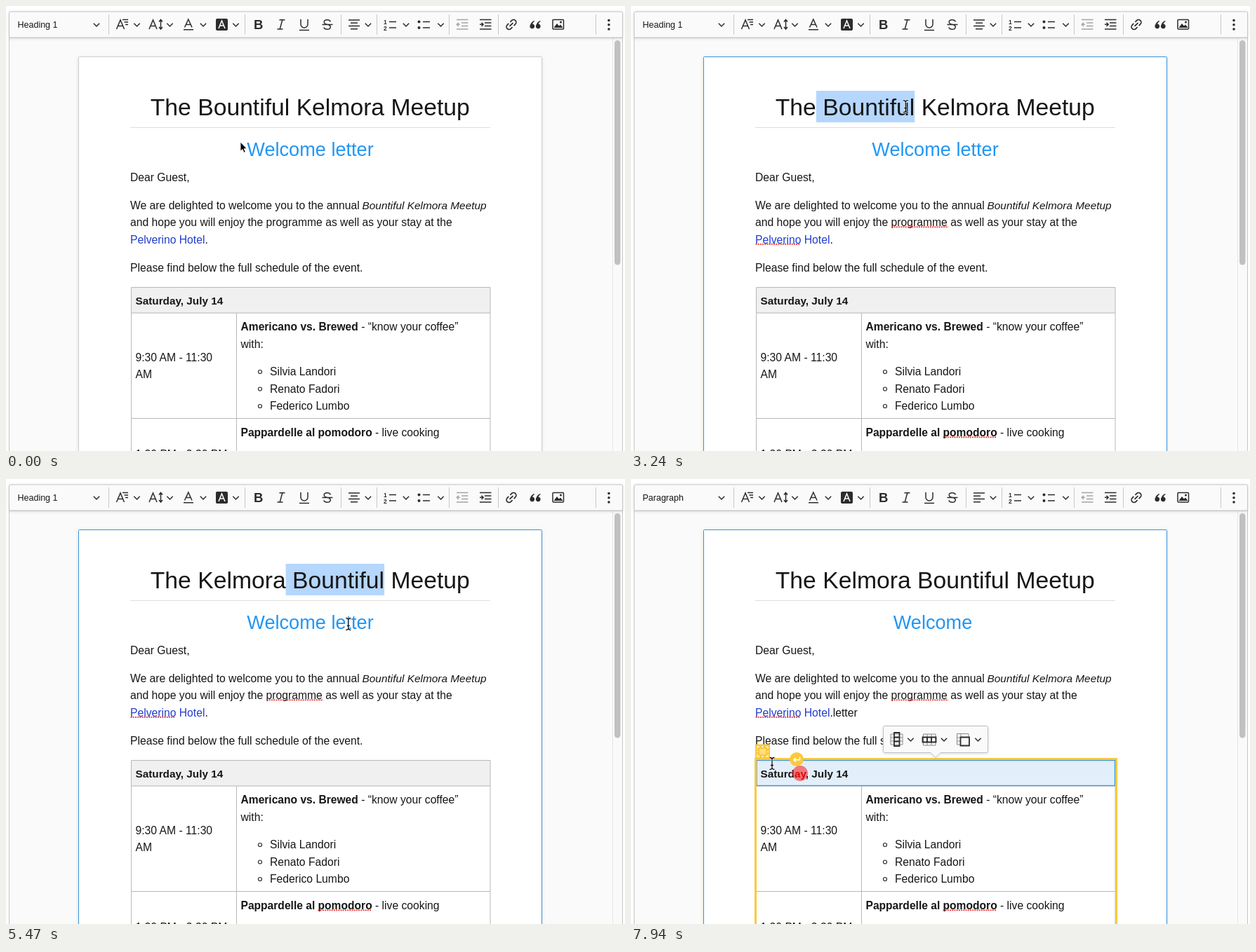
Recreate the animation shown at these times as an HTML page. Size 882 px wide and 635 px high, loop 8000 ms.

```html
<!DOCTYPE html>
<html lang="en">
<head>
<meta charset="utf-8">
<title>Document editor</title>
<style>
  html, body { margin: 0; width: 100%; height: 100%; overflow: hidden; background: #fff; }
  svg { display: block; width: 882px; height: 635px; font: 15.7px "Liberation Sans", Arial, sans-serif; fill: #161616; }
  text { white-space: pre; }
  .title { font-size: 33.7px; text-anchor: middle; }
  .sub { font-size: 27.15px; fill: #2196f3; text-anchor: middle; }
  .b { font-weight: bold; font-size: 15.6px; }
  .line { fill: none; stroke: #2c2c2c; stroke-width: 1.5; }
  .off { stroke: #a5a5a5; }
  .rule { fill: none; stroke: #b8b8b8; }
  .spell { stroke: #f0322d; stroke-width: 1.8; stroke-dasharray: 2 1.2; }
  .sel { fill: #b5d6fd; }
  .drop { fill: #2d86dc; }
  .gold { fill: #fbc93d; }
  .lit { mix-blend-mode: lighten; fill: #b00; }
</style>
</head>
<body>
<svg viewBox="0 0 882 635">
  <defs>
    <linearGradient id="fadeDark">
      <stop offset="0" stop-color="#222" stop-opacity=".45"/>
      <stop offset=".5" stop-color="#222" stop-opacity=".8"/>
      <stop offset="1" stop-color="#222" stop-opacity=".4"/>
    </linearGradient>
    <radialGradient id="haze">
      <stop offset="0" stop-color="#000" stop-opacity=".07"/>
      <stop offset="1" stop-color="#000" stop-opacity="0"/>
    </radialGradient>
    <filter id="soft" x="-10%" y="-10%" width="120%" height="130%">
      <feDropShadow dx="0" dy="1" stdDeviation="2" flood-opacity=".13"/>
    </filter>
    <path id="chev" class="line" d="M-4.2-2.2 0 2 4.2-2.2"/>
    <path id="arrow" d="M0 0V13.2L3 10.5 5.1 15.3 7.3 14.3 5.2 9.7H9.2Z" fill="#000" stroke="#fff" stroke-width=".9"/>
    <path id="beam" d="M-3.5-8.5Q-.6-8.5 0-6.5 .6-8.5 3.5-8.5M0-7V7M-3.5 8.5Q-.6 8.5 0 6.5 .6 8.5 3.5 8.5M-2 2.5H2" fill="none"/>
  </defs>

  <!-- frame and page -->
  <rect x="4.5" y="45" width="874" height="600" fill="#fafafa" stroke="#c4c4c4"/>
  <path d="M864.5 46V635" stroke="#e6e6e6"/>
  <rect x="867" y="49" width="8.5" height="320.5" rx="4.2" fill="#c1c1c1"/>
  <rect id="page" x="103.5" y="72.5" width="660" height="600" rx="1" fill="#fff" stroke="#cfcfcf" filter="url(#soft)"/>

  <!-- headings -->
  <rect id="titleSel" class="sel" y="121" height="45"/>
  <text id="titleA" class="title" x="433.3" y="156">The Bountiful Kelmora Meetup</text>
  <text id="titleB" class="title" x="433.3" y="156">The Kelmora Bountiful Meetup</text>
  <path d="M177 173.5H690" stroke="#dedede"/>
  <rect id="subSel" class="sel" x="463" y="179" width="61" height="50.5"/>
  <text id="sub" class="sub" y="214">Welcome letter</text>

  <!-- body -->
  <text x="177" y="250">Dear Guest,</text>
  <text x="177" y="290">We are delighted to welcome you to the annual</text>
  <text x="507.5" y="290" font-style="italic" font-size="15.4">Bountiful Kelmora Meetup</text>
  <text x="177" y="314">and hope you will enjoy the programme as well as your stay at the</text>
  <text id="hotel" x="177" y="338.5"><tspan fill="#1f3cd0">Pelverino Hotel</tspan>.<tspan id="moved">letter</tspan></text>
  <text x="177" y="378.5">Please find below the full schedule of the event.</text>

  <!-- table -->
  <rect x="178.5" y="401.5" width="511.5" height="37" fill="#f0f0f0"/>
  <rect id="cell" x="179" y="401.5" width="510.5" height="36" fill="#e2effb"/>
  <path class="rule" d="M178.5 640V401.5H690V640M178.5 438H690M178.5 588.5H690M328.5 438V640"/>
  <rect id="cellEdge" x="179" y="401.5" width="510.5" height="36" fill="none" stroke="#3f95dd" stroke-width="1.3"/>
  <text class="b" x="184.5" y="426" style="font-size:15.3px">Saturday, July 14</text>
  <text x="184.5" y="507">9:30 AM - 11:30</text>
  <text x="184.5" y="531">AM</text>
  <text x="334.5" y="463"><tspan class="b">Americano vs. Brewed</tspan> - “know your coffee”</text>
  <text x="334.5" y="487.5">with:</text>
  <g class="line" style="stroke-width:1.2">
    <circle cx="362" cy="522" r="2.5"/><circle cx="362" cy="546.5" r="2.5"/><circle cx="362" cy="571" r="2.5"/>
  </g>
  <text x="376" y="527">Silvia Landori</text>
  <text x="376" y="551.5">Renato Fadori</text>
  <text x="376" y="575.5">Federico Lumbo</text>
  <text x="334.5" y="614"><tspan class="b">Pappardelle al pomodoro</tspan> - live cooking</text>
  <text x="184.5" y="644.5">1:30 PM - 3:30 PM</text>
  <g id="spell" class="spell">
    <path d="M371.5 315.3H452"/><path d="M177.5 339.8H241.5"/><path d="M444.5 615.3H521"/>
  </g>

  <!-- table hover controls -->
  <rect id="ring" x="177.5" y="399.5" width="514" height="250" fill="none" stroke="#fbc93d" stroke-width="3"/>
  <g id="grip">
    <rect class="gold" x="177" y="378.5" width="21" height="21"/>
    <path d="M180 385V382H183M192 382H195V385M195 393V396H192M183 396H180V393M186 382H189M186 396H189M180 388V390M195 388V390" fill="none" stroke="#fff3cf" stroke-width="1.3"/>
    <rect x="183" y="385" width="9" height="8" fill="#ffdf85"/>
  </g>
  <g id="knob">
    <circle class="gold" cx="236" cy="400" r="10"/>
    <path d="M240.5 396.5V400.8H232M234.8 398 232 400.8 234.8 403.6" fill="none" stroke="#fff" stroke-width="1.6"/>
  </g>

  <path id="caret" stroke="#000" stroke-width="1.2"/>

  <!-- floating table tools -->
  <g id="popup">
    <path d="M361.5 352.5H506.5Q508.5 352.5 508.5 354.5V388.5Q508.5 390.5 506.5 390.5H441L434 397.5 427 390.5H361.5Q359.5 390.5 359.5 388.5V354.5Q359.5 352.5 361.5 352.5Z" fill="#fafafa" stroke="#bfbfbf" filter="url(#soft)"/>
    <g class="line" style="stroke-width:1">
      <path d="M370 364H387V379H370ZM370 369H387M370 374H387" stroke="#8a8a8a"/>
      <path d="M375 362H382.5V381H375ZM375 368.5H382.5M375 374.5H382.5" stroke-width="1.8"/>
      <path d="M416.5 364H434V380H416.5ZM422 364V380M428 364V380" stroke="#8a8a8a"/>
      <path d="M415.5 368.5H434.5V375.5H415.5ZM422 368.5V375.5M428 368.5V375.5" stroke-width="1.8"/>
      <path d="M464.5 363.5H481V379H464.5ZM470 363.5V379M464.5 369H481M464.5 374H481" stroke="#8a8a8a"/>
      <path d="M469.5 368.5H482V380.5H469.5Z" fill="#fafafa" stroke-width="1.8"/>
    </g>
    <use href="#chev" x="398.5" y="372"/><use href="#chev" x="446" y="372"/><use href="#chev" x="494.5" y="372"/>
  </g>

  <!-- main toolbar -->
  <rect x="4.5" y="8" width="874" height="37" rx="2" fill="#fafafa" stroke="#c4c4c4" filter="url(#soft)"/>
  <g id="bar"></g>
  <text id="style" x="16.5" y="30.5" font-size="12.5">Heading 1</text>
  <g class="line">
    <path d="M157.5 33 163 20 168.5 33M159.5 28.5H166.5M166 19.5H174M168.5 23H174M170 26.5H174"/>
    <path d="M204 33 209.5 20 215 33M206 28.5H213M220.5 20V32.5M218 22.5 220.5 19.5 223 22.5M218 30 220.5 33 223 30"/>
    <path d="M254.5 30.5 259.8 19 265 30.5M256.5 26.5H263M253 33.8H267"/>
    <rect x="299" y="18" width="17" height="17" rx="2" fill="#2c2c2c" stroke="none"/>
    <path d="M303 32 307.5 21 312 32M304.8 28H310.3" stroke="#fff"/>
    <path d="M389.5 19.8H397.5M386.5 33H394.5M393.8 20 390.2 33"/>
    <path d="M420 19V26A5 5 0 0 0 430 26V19M418 34.5H432"/>
    <path d="M462.5 22.3Q461 19.5 457.5 19.7 453 20 453.3 23 453.5 25.5 457.5 26.3 462.5 27.5 462.3 30 462 33.2 457.8 33.3 454 33.3 452.8 30.5M450.5 26.5H465.5"/>
    <path id="align"/>
    <path d="M546 22.5H556M546 31H556M594 22.5H604M594 31H604"/>
    <path class="off" d="M642 19.5H658.5M649 24H658.5M649 28.5H658.5M642 33H658.5M647 26.3H642.5M645 23.7 642.3 26.3 645 29"/>
    <path d="M675 19.5H691.5M682 24H691.5M682 28.5H691.5M675 33H691.5M675 26.3H680M677.5 23.7 680.2 26.3 677.5 29"/>
    <g transform="rotate(-45 720 26.5)">
      <path d="M718.5 22.8H715.5A3.7 3.7 0 0 0 715.5 30.2H718.5M721.5 22.8H724.5A3.7 3.7 0 0 1 724.5 30.2H721.5M716.5 26.5H723.5" stroke-width="1.7"/>
    </g>
    <rect x="779" y="19.5" width="15.5" height="13.5" rx="1"/>
    <path d="M780.5 31 785 25 788 28.5 790 26.5 793.5 31Z" fill="#2c2c2c" stroke="none"/>
    <circle cx="790.5" cy="23" r="1.5" fill="#2c2c2c" stroke="none"/>
  </g>
  <g fill="#2c2c2c">
    <text x="353" y="33" font-weight="bold" font-size="18.5">B</text>
    <text x="538" y="25.5" font-size="8.5" font-weight="bold">1</text>
    <text x="538" y="35" font-size="8.5" font-weight="bold">2</text>
    <circle cx="588.5" cy="22.5" r="2"/><circle cx="588.5" cy="31" r="2"/>
    <path d="M753 21Q748.5 22 746.5 28A3.4 3.4 0 1 0 750 25.5Q751 23 753 22ZM761.5 21Q757 22 755 28A3.4 3.4 0 1 0 758.5 25.5Q759.5 23 761.5 22Z"/>
    <circle cx="859" cy="20.5" r="1.8"/><circle cx="859" cy="26.8" r="1.8"/><circle cx="859" cy="33" r="1.8"/>
  </g>

  <!-- drag pieces, click mark, pointer -->
  <g id="ghostA">
    <ellipse cx="338" cy="146" rx="76" ry="24" fill="url(#haze)"/>
    <text x="273.3" y="156" font-size="33.7" fill="url(#fadeDark)">Bountiful</text>
  </g>
  <text id="ghostB" x="463" y="214" font-size="27.15" fill="#2196f3" opacity=".65">letter</text>
  <path id="mark" class="drop"/>
  <g id="press"><circle class="lit"/><circle fill="#f00" opacity=".5"/></g>
  <use id="tip" href="#arrow"/>
  <g id="ibeam">
    <use href="#beam" stroke="#fff" stroke-width="3" stroke-opacity=".8"/>
    <use href="#beam" stroke="#111" stroke-width="1.3"/>
  </g>
</svg>
<script>
const LOOP = 8000;
const $ = id => document.getElementById(id);
const set = (el, attrs) => { for (const k in attrs) el.setAttribute(k, attrs[k]); };
const show = (id, on) => { $(id).style.visibility = on ? 'visible' : 'hidden'; };
const move = (id, x, y) => $(id).setAttribute('transform', `translate(${x} ${y})`);
const ramp = (t, a, b) => Math.min(1, Math.max(0, (t - a) / (b - a)));
const within = (t, a, b) => t >= a && t < b;
const smooth = p => p * p * (3 - 2 * p);
const out = p => 1 - (1 - p) * (1 - p);

// pointer: time, x, y, easing on arrival
const path = [
  [0, 334, 194], [590, 334, 194], [880, 318, 145], [1380, 318, 145],
  [2100, 266, 146], [2250, 266, 146], [2850, 402, 145], [3200, 402, 145],
  [3500, 360, 138, out], [3640, 360, 138], [4130, 543, 145], [4410, 543, 145],
  [4880, 537, 146], [5120, 537, 146], [5500, 487, 208], [6330, 487, 208],
  [6700, 283, 329], [6800, 283, 329], [7400, 249, 415], [7590, 249, 415],
  [7680, 241, 420], [7760, 241, 420], [7930, 201, 406], [LOOP, 201, 406]
];
// clicks: down, up, x, y
const clicks = [
  [890, 950, 317, 145], [2090, 2250, 266, 146], [3540, 3640, 360, 138],
  [5530, 5590, 487, 208], [5700, 5780, 487, 208], [6180, 6330, 487, 208],
  [7680, 7760, 241, 420]
];

function pointer(t) {
  const i = path.findIndex(k => k[0] > t);
  const [t0, x0, y0] = path[i - 1], [t1, x1, y1, ease = smooth] = path[i];
  const p = ease((t - t0) / (t1 - t0));
  return [x0 + (x1 - x0) * p, y0 + (y1 - y0) * p];
}

function edges(el) {
  const xs = [el.getStartPositionOfChar(0).x];
  for (let i = 0; i < el.getNumberOfChars(); i++) xs.push(el.getEndPositionOfChar(i).x);
  return xs;
}
const nearest = (xs, x) => xs.reduce((a, b) => Math.abs(b - x) < Math.abs(a - x) ? b : a);

const edgeA = edges($('titleA')), edgeB = edges($('titleB')), edgeH = edges($('hotel'));
const dropX = edgeH[16], endX = edgeH[22];

const bar = [146, 340, 477, 528, 631, 701, 840].map(x => `<path d="M${x + .5} 12V41" stroke="#c8c8c8"/>`)
  .concat([129, 186.5, 233.5, 281, 327.5, 516, 570, 619.5].map(x => `<use href="#chev" x="${x}" y="27"/>`));
$('bar').innerHTML = bar.join('');

function selectTitle(a, b) {
  set($('titleSel'), { x: a, width: Math.max(0, b - a) });
}
function marker(x, y, h, s) {
  $('mark').setAttribute('d', `M${x - s} ${y}h${2 * s}l${1 - s} ${s + 1}v${h}h-2v${-h}z`);
}

function draw(t) {
  const [x, y] = pointer(t);
  const focus = t >= 900, swapped = t >= 5130, dropped = t >= 6790;
  const dragA = within(t, 3660, 5130), dragB = within(t, 6340, 6790);

  set($('page'), { stroke: focus ? '#3b95de' : '#cfcfcf' });
  show('titleA', !swapped);
  show('titleB', swapped);
  show('spell', t >= 2300);

  if (within(t, 2250, 5130)) {
    selectTitle(edgeA[3], t < 2850 ? nearest(edgeA.slice(3, 14), x) : edgeA[13]);
  } else if (within(t, 5130, 5540)) {
    selectTitle(edgeB[11], edgeB[21]);
  } else selectTitle(0, 0);

  // the space left behind keeps the shorter heading a little left of centre
  $('sub').textContent = dropped ? 'Welcome' : 'Welcome letter';
  set($('sub'), { x: dropped ? 430 : 433.5 });
  show('subSel', within(t, 5710, 6790));
  show('moved', dropped);
  $('style').textContent = dropped ? 'Paragraph' : t >= 5540 ? 'Heading 2' : 'Heading 1';
  const s = dropped ? 488 : 491;
  set($('align'), { d: `M488 20H504M${s} 24.3h10M488 28.5H504M${s} 32.8h10` });

  const early = within(t, 900, 2240) && (t - 950) % 1060 < 530;
  const late = within(t, 6790, 7580);
  show('caret', early || late);
  set($('caret'), { d: early ? `M${edgeA[6]} 124V163` : `M${endX} 324V342` });

  show('ghostA', dragA);
  show('ghostB', dragB);
  show('mark', dragA || dragB);
  if (dragA) {
    move('ghostA', x - 360, y - 138);
    marker(nearest(edgeA, x + 4), 117, 42, 5.5);
  }
  if (dragB) {
    move('ghostB', x - 487, y - 208);
    if (x < 320) marker(dropX, 321, 16, 4); else show('mark', false);
  }

  $('ring').style.opacity = $('knob').style.opacity = ramp(t, 7290, 7490);
  $('grip').style.opacity = ramp(t, 7380, 7530);
  show('cell', t >= 7690);
  show('cellEdge', t >= 7690);
  show('popup', t >= 7800);

  const hit = clicks.filter(c => t >= c[0]).pop();
  const r = hit ? 20.5 * ramp(t, hit[0], hit[0] + 70) * (1 - ramp(t, hit[1], hit[1] + 390)) : 0;
  for (const c of $('press').children) set(c, { r, cx: hit ? hit[2] : 0, cy: hit ? hit[3] : 0 });

  const arrow = t < 620 || dragA || dragB;
  show('tip', arrow);
  show('ibeam', !arrow);
  move('tip', x, y);
  move('ibeam', x, y);
}

const start = performance.now();
function tick(now) {
  draw(Math.max(0, now - start) % LOOP);
  requestAnimationFrame(tick);
}
draw(0);
requestAnimationFrame(tick);
</script>
</body>
</html>
```
